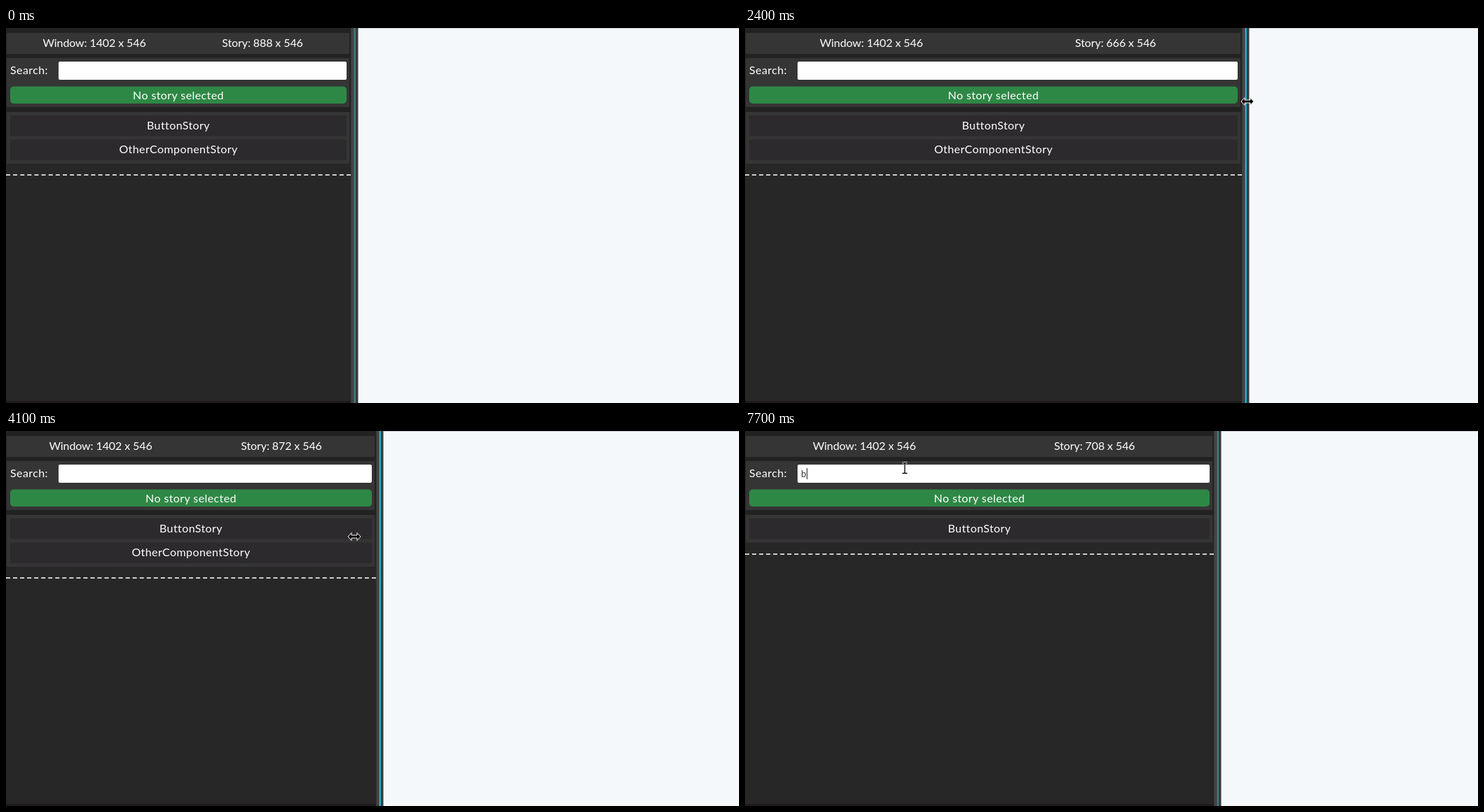
Write an HTML page that moves like this. It is 1046 px wide and 536 px high and loops after 8 s.

```html
<!DOCTYPE html>
<html lang="en">
<head>
<meta charset="utf-8">
<title>Story browser</title>
<style>
  html, body { margin: 0; width: 100%; height: 100%; overflow: hidden; background: #f4f8fb; }
  svg { display: block; width: 100vw; height: 100vh; }
  text { font: 16px Lato, "Open Sans", sans-serif; fill: #fff; letter-spacing: .4px; white-space: pre; }
  .mid { text-anchor: middle; }
  .size { letter-spacing: -.1px; }
  .typed { font-size: 13.3px; letter-spacing: -1.3px; fill: #333; }
  .card { fill: #363536; }
  .row { fill: #2c2a2d; }
</style>
</head>
<body>
<svg id="stage" viewBox="0 0 1046 536" preserveAspectRatio="none"></svg>
<script>
const LOOP = 8000, STEP = 100, MIN_WIDTH = 197;
const REST = [58, 140, 148], HOT = [22, 205, 230];

// [time, divider position asked for by the mouse]
const drag = [
  [1700, 492], [1800, 494], [1900, 492], [2000, 410], [2100, 348], [2200, 480],
  [2300, 640], [2400, 709], [2500, 713], [2600, 610], [3100, 215], [3250, 178],
  [3350, 178], [3450, 155], [3550, 144], [3650, 144], [3700, 220], [3900, 590],
  [4000, 640], [4100, 528], [4300, 380], [4400, 345], [4500, 376], [4600, 590], [4700, 669]
];
// [time, x, y]; x is only used while nothing is dragged
const mouse = [
  [500, 180, 35], [600, 230, 38], [700, 330, 42], [800, 420, 44], [900, 480, 46],
  [1000, 502, 74], [1100, 502, 74], [1200, 507, 80], [1300, 507, 82], [1400, 504, 84],
  [1500, 500, 84], [1800, 500, 84], [2400, 717, 105], [3200, 184, 123], [3500, 150, 124],
  [4100, 497, 151], [4600, 677, 158], [4700, 647, 160], [4800, 647, 160], [4900, 560, 140],
  [5000, 400, 105], [5100, 222, 66], [5200, 232, 58], [5400, 232, 58], [5500, 228, 53]
];
// [time, highlight of the divider]
const glow = [
  [900, 0], [1000, .2], [1100, .2], [1200, .4], [1500, .8], [1700, .8], [1900, 1],
  [3000, 1], [3200, 0], [3600, 0], [3800, 1], [4500, 1], [4700, 0]
];
// [time, search text, caret x or 0]
const typing = [
  [0, "", 0], [5700, "1", 86], [5800, "12", 92], [6000, "123", 98], [6400, "123", 0],
  [6700, "1", 0], [6800, "", 0], [7300, "", 80], [7700, "b", 88]
];

function at(track, t, i = 1) {
  const n = track.findIndex(k => k[0] > t);
  if (n < 0) return track[track.length - 1][i];
  if (n === 0) return track[0][i];
  const a = track[n - 1], b = track[n];
  return a[i] + (b[i] - a[i]) * (t - a[0]) / (b[0] - a[0]);
}

const rect = (x, y, w, h, fill, more = "") =>
  `<rect x="${x}" y="${y}" width="${w}" height="${h}" ${fill[0] === "." ? `class="${fill.slice(1)}"` : `fill="${fill}"`} ${more}/>`;
const text = (x, y, s, cls = "") => `<text x="${x}" y="${y}" class="${cls}">${s}</text>`;

function dashes(y, w) {
  const n = Math.floor((w + 4) / 10), gap = (w - 6 * n) / (n - 1);
  return `<path d="M0 ${y}H${w}" stroke="#cfcfcf" stroke-width="2" stroke-dasharray="6 ${gap}"/>`;
}

function sizeLabel(x, name, size, wrap) {
  return wrap
    ? text(x, 27, name, "mid size") + text(x, 47, size, "mid size")
    : text(x, 27, name + " " + size, "mid size");
}

function cursor(t, w) {
  if (t < 400) return "";
  const held = t >= 1800 && t < 4700;
  const x = held ? at(drag, t + 50) + 6 : at(mouse, t), y = at(mouse, t, 2);
  const inField = x > 75 && x < w - 6 && y > 48 && y < 74;
  let shape;
  if (t >= 1000 && t < 4700)
    shape = `<path d="M-9 0L-4 -5.5V-2H4V-5.5L9 0L4 5.5V2H-4V5.5Z" fill="#000" stroke="#fff"/>`;
  else if (inField || (t >= 5100)) {
    const d = "M-3.5 -7.5H-1L0 -6.5L1 -7.5H3.5M0 -6.5V6.5M-3.5 7.5H-1L0 6.5L1 7.5H3.5";
    shape = `<path d="${d}" fill="none" stroke="#fff" stroke-width="3"/><path d="${d}" fill="none" stroke="#000" stroke-width="1.3"/>`;
  } else
    shape = `<path d="M.5 1V17L4.5 13.5L7.3 20L10 19L7.2 12.6H12.7Z" fill="#000" stroke="#fff"/>`;
  return `<g transform="translate(${x} ${y})">${shape}</g>`;
}

function stories(w, query) {
  const names = ["ButtonStory", "OtherComponentStory"].filter(n => n.toLowerCase().startsWith(query));
  const h = names.length ? names.length * 34.5 + 5 : 30;
  let out = rect(1, 120, w - 3, h, ".card");
  if (!names.length) out += text(w / 2, 140, "No stories found", "mid");
  names.forEach((n, i) => {
    const y = 125 + i * 34.5;
    out += rect(6, y, w - 12, 29.5, ".row") + text(w / 2, Math.floor(y) + 20, n, "mid");
  });
  return out + dashes(Math.round(120 + h + 16), w);
}

function draw(t) {
  const w = Math.round(Math.max(MIN_WIDTH, at(drag, t)));
  const measured = Math.max(MIN_WIDTH, at(drag, t + 27));
  const story = 1402 - Math.round(1.017 * (measured + 10) + 3.4);
  const col = (w - 12) / 2;
  const wrapWin = col < 142, wrapStory = col < (story > 999 ? 124 : 116);
  const drop = wrapWin || wrapStory ? 20 : 0;
  const [, query, caret] = typing.filter(k => k[0] <= t).pop();
  const g = at(glow, t);
  const line = REST.map((c, i) => Math.round(c + (HOT[i] - c) * g));

  return rect(0, 0, 1046, 536, "#f4f8fb") + rect(0, 0, 1046, 1, "#cbcfd3")
    + rect(0, 0, w, 536, "#272727")
    + rect(0, 0, w, 120 + drop, "#232223")
    + rect(0, 533, w, 3, "#1f1b1d")
    + rect(1, 7, w - 3, 30 + drop, ".card")
    + sizeLabel(w / 4 + 3, "Window:", "1402 x 546", wrapWin)
    + sizeLabel(w * .75 - 3, "Story:", story + " x 546", wrapStory)
    + `<g transform="translate(0 ${drop})">`
    + rect(1, 43, w - 3, 70, ".card")
    + text(6, 66, "Search:")
    + rect(75, 48, w - 81, 26, "#fff", 'rx="2"')
    + text(80, 66, query, "typed")
    + (caret ? rect(caret, 53, 1, 16, "#222") : "")
    + rect(6, 83.5, w - 12, 24.5, "#2e8845", 'rx="5"')
    + text(w / 2, 102, "No story selected", "mid")
    + stories(w, query)
    + "</g>"
    + rect(w, 0, 10.5, 536, "#3a393a") + rect(w + 1, 0, 3, 536, "#444344")
    + rect(w + 4.7, 0, 2, 536, `rgb(${line})`)
    + cursor(t, w);
}

const stage = document.getElementById("stage");
const start = performance.now();
let shown = -1;
function tick() {
  const t = Math.floor((performance.now() - start) % LOOP / STEP) * STEP;
  if (t !== shown) stage.innerHTML = draw(shown = t);
  requestAnimationFrame(tick);
}
tick();
</script>
</body>
</html>
```
